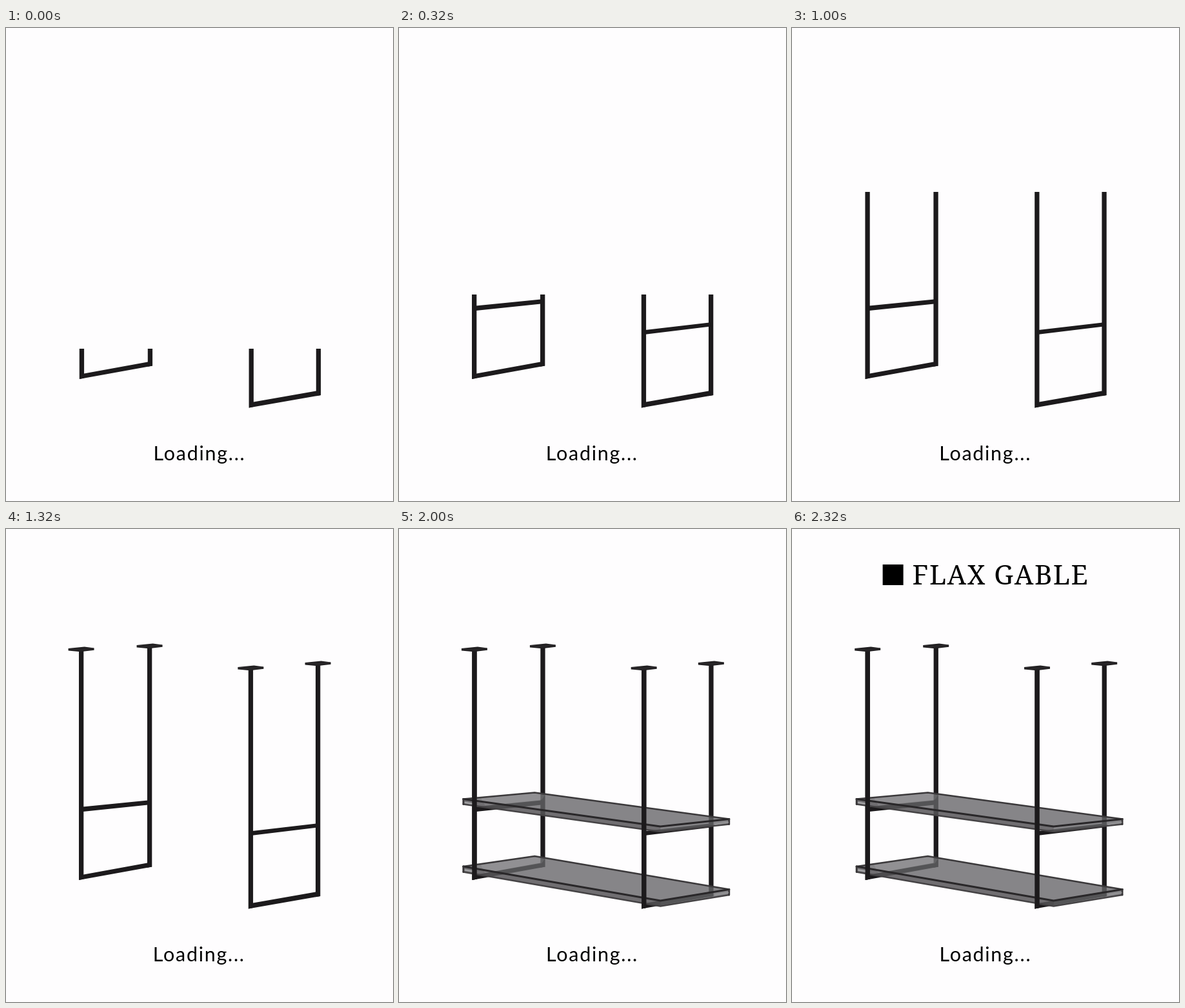
Write an HTML page with a canvas that moves like this. It is 600 px wide and 733 px high and loops after 2680 ms.

```html
<!DOCTYPE html>
<html lang="en">
<head>
<meta charset="utf-8">
<title>Loading</title>
<style>
  html, body { margin: 0; width: 100%; height: 100%; overflow: hidden; background: #fefdfe; }
  canvas { display: block; }
</style>
</head>
<body>
<canvas id="stage" width="600" height="733"></canvas>
<script>
const ctx = document.getElementById('stage').getContext('2d');
const LOOP = 2680;
const STEEL = '#1c1a1c';

// Each stage: start time, top of the posts, sideways jitter
const STAGES = [
  { at: 0, top: 497, dx: 0.8 },
  { at: 320, top: 413, dx: 0 },
  { at: 680, top: 334, dx: 0.2 },
  { at: 1000, top: 254, dx: 0.4 },
  { at: 1320, top: 0, dx: 0 },
  { at: 1680, top: 0, dx: 0.4 },
  { at: 2000, top: 0, dx: 0.3 },
  { at: 2320, top: 0, dx: 0.6 }
];

const FRAMES = [
  { l: 113, r: 219, mountL: 186.5, mountR: 182, footL: 544, footR: 523.5,
    innerL: 535.5, innerR: 517.5, bar: [430.5, 420.5, 427.5, 438] },
  { l: 375.8, r: 480, mountL: 215.5, mountR: 209, footL: 588.5, footR: 569,
    innerL: 579.5, innerR: 562.5, bar: [468, 456.5, 462.8, 474.8] }
];
const POST = 7.3;

// Corners in the order left, back, right, front
const LOWER = [[99.5, 523], [210, 507], [511.5, 558.5], [405, 576]];
const UPPER = [[99.5, 418.5], [210, 408.5], [511.5, 449.5], [405, 461]];

function trace(points, close = true) {
  ctx.beginPath();
  points.forEach(([x, y]) => ctx.lineTo(x, y));
  if (close) ctx.closePath();
}

function fill(points, color) {
  trace(points);
  ctx.fillStyle = color;
  ctx.fill();
}

function line(points, color, width, close = false) {
  trace(points, close);
  ctx.strokeStyle = color;
  ctx.lineWidth = width;
  ctx.stroke();
}

function post(x, top, bottomL, bottomR) {
  fill([[x, top], [x + POST, top], [x + POST, bottomR], [x, bottomL]], STEEL);
}

function frontPost(f, top) {
  post(f.l, top || f.mountL, f.footL, f.footL - 1.4);
}

function drawFrame(f, top, withBar) {
  const inL = f.l + POST, outR = f.r + POST;
  frontPost(f, top);
  post(f.r, top || f.mountR, f.footR + 1.3, f.footR);
  fill([[f.l, f.footL], [inL, f.innerL], [f.r, f.innerR], [outR, f.footR]], STEEL);
  if (withBar) {
    const [a, b, c, d] = f.bar;
    fill([[inL - 1, a], [f.r + 1, b], [f.r + 1, c], [inL - 1, d]], STEEL);
  }
}

function plate(x, y) {
  const at = ([px, py]) => [x + px, y + py];
  fill([[-20, -1.5], [5, -4], [20, -2], [20, 1.3], [-1, 3.8], [-20, 2]].map(at), '#222022');
  line([[-19, -1], [-1, 0.7], [19, -1.6]].map(at), '#343234', 0.8);
}

function mounts(f) {
  plate(f.l + 3.6, f.mountL);
  plate(f.r + 3.6, f.mountR - 0.5);
}

function shelf(top, depth) {
  const [left, back, right, front] = top;
  const drop = ([x, y]) => [x, y + depth];
  const [left2, right2, front2] = [left, right, front].map(drop);

  fill([left, back, right, right2, front2, left2], 'rgba(100,101,103,.78)');
  fill([left, front, front2, left2], 'rgba(60,59,61,.3)');
  // Paler patch in the far corner
  fill([[left[0] + 27, left[1] - 2], back, [226, back[1] + 4],
    [221, back[1] + 11], [133, left[1] + 10]], 'rgba(255,255,255,.09)');

  line([left2, front2, right2], '#454345', 2.6);
  line([left, back, right], '#3b393b', 2.6);
  line([left, front, right], '#292729', 3.2);
  line([left, left2], '#373537', 2.8);
  line([right, right2], '#373537', 2.8);
  line([[102.5, left[1] + 5.5], [113, left[1] + 7.3]], '#a3a3a5', 2.6);
  line([[490, right[1] + 8.2], [510, right[1] + 5]], '#949496', 2);
}

function text(str, x, y, font, spacing, color) {
  ctx.font = font;
  ctx.letterSpacing = spacing + 'px';
  ctx.fillStyle = color;
  ctx.fillText(str, x, y);
}

function draw(t) {
  const n = STAGES.findLastIndex(s => t >= s.at);
  const { top, dx } = STAGES[n];
  ctx.setTransform(1, 0, 0, 1, 0, 0);
  ctx.fillStyle = '#fefdfe';
  ctx.fillRect(0, 0, 600, 733);
  ctx.translate(dx, 0);
  ctx.lineJoin = ctx.lineCap = 'round';

  FRAMES.forEach(f => drawFrame(f, top, n > 0));
  if (n >= 5) shelf(LOWER, 8.5);
  if (n >= 6) shelf(UPPER, 8);
  if (n >= 5) FRAMES.forEach(f => frontPost(f, top));
  if (n >= 4) FRAMES.forEach(mounts);

  if (n === 7) {
    ctx.fillStyle = '#000';
    ctx.fillRect(140, 55, 32, 32);
    text('FLAX GABLE', 186, 86, '42px "Noto Serif", serif', 1.5, '#000');
  }
  text('Loading...', 227.8, 670, '30.5px Lato, sans-serif', 1.7, '#000');
}

function tick() {
  draw(performance.now() % LOOP);
  requestAnimationFrame(tick);
}
tick();
</script>
</body>
</html>
```
